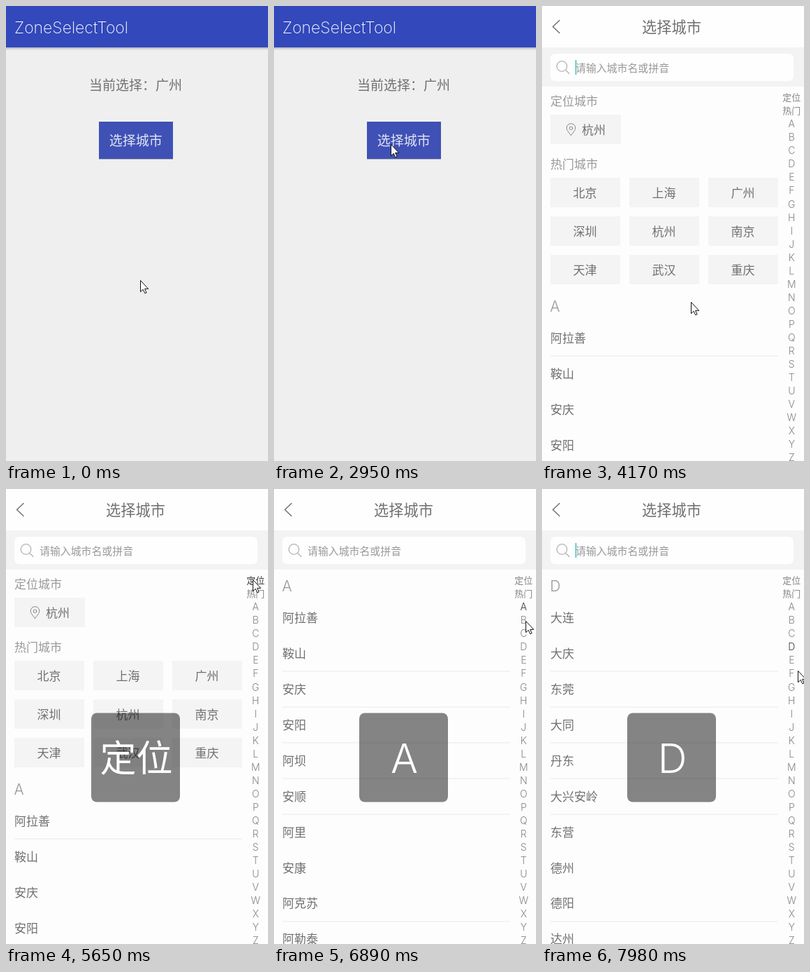
An HTML page that plays this animation: 375x649 px, repeating every 8000 ms.

```html
<!DOCTYPE html>
<html lang="zh-CN">
<head>
<meta charset="utf-8">
<title>选择城市</title>
<style>
  html, body { margin: 0; width: 100%; height: 100%; overflow: hidden; background: #efefef; }
  svg { display: block; width: 375px; height: 649px; }
  text { font-family: Inter, "Noto Sans CJK SC", "Noto Sans CJK", sans-serif; font-weight: 300; fill: #707070; }
  .soft { fill: #999; }
  .white { fill: #fff; }
  .thin { font-weight: 200; }
  .pale { fill: #e2e5f4; }
  .chip { fill: #f4f4f4; }
  .line { fill: #e9e9e9; }
  .stroke { fill: none; stroke-linecap: round; stroke-linejoin: round; }
  #index text { fill: #868686; }
  #index text.on { fill: #3c3c3c; }
  #button { fill: #3f51b5; filter: drop-shadow(0 1px .7px rgba(0,0,0,.25)); }
  #button.down { fill: #4656b7; filter: drop-shadow(0 2px 1.5px rgba(0,0,0,.35)); }
</style>
</head>
<body>
<svg id="stage" viewBox="0 0 375 649"></svg>
<script>
const LOOP = 8000, TICK = 134;   // the screen refreshes once per tick
const PRESS = 19, RELEASE = 22, TOUCH = 41;
const ROW = 50.9, INDEX_TOP = 130, INDEX_STEP = 19.04;

// turning points of the pointer: [tick, x, y]
const path = [
  [0, 192, 391], [2, 227, 349], [3, 227, 349], [6, 274, 305], [12, 173, 211],
  [15, 167, 197], [24, 167, 197], [29, 197, 459], [31, 213, 422], [35, 362, 165],
  [40, 353, 129], [42, 353, 129], [45, 355, 169], [48, 355, 169],
  [51, 360, 188], [55, 364, 246], [59, 366, 259]
];

const cities = {
  A: '阿拉善 鞍山 安庆 安阳 阿坝 安顺 阿里 安康 阿克苏 阿勒泰',
  B: '北京 保定 包头 巴彦淖尔 本溪 白山 白城 蚌埠 亳州 滨州',
  C: '承德 沧州 长治 赤峰 朝阳 长春 常州 滁州 池州 长沙',
  D: '大连 大庆 东莞 大同 丹东 大兴安岭 东营 德州 德阳 达州'
};
const hot = '北京 上海 广州 深圳 杭州 南京 天津 武汉 重庆'.split(' ');
const sections = ['定位', '热门', ...'ABCDEFGHIJKLMNOPQRSTUVWXYZ'];

// y is the vertical middle of the glyphs
const text = (x, y, size, str, cls = '', anchor = 'start') =>
  `<text x="${x}" y="${y}" dy=".37em" font-size="${size}" class="${cls}" text-anchor="${anchor}">${str}</text>`;
const mid = (x, y, size, str, cls) => text(x, y, size, str, cls, 'middle');
const rect = (x, y, w, h, attrs) => `<rect x="${x}" y="${y}" width="${w}" height="${h}" ${attrs}/>`;

// hairlines fall between pixels on two rows out of seven; phase shifts that pattern
const cityRows = (letter, top, phase) =>
  text(11.5, top, 21, letter, 'soft') +
  cities[letter].split(' ').map((city, i) => {
    const y = top + 46 + i * ROW, lined = (i + phase) % 7 % 6 > 0;
    return text(12, y, 17, city) +
      (lined ? rect(12, Math.round(y + ROW / 2) - .5, 326, 1, 'class="line"') : '');
  }).join('');

const home = `
  ${rect(0, 59, 375, 4, 'fill="url(#shade)"')}
  ${rect(0, 0, 375, 59, 'fill="#3248bb"')}
  ${text(12, 30.5, 23, 'ZoneSelectTool', 'white thin')}
  ${text(119, 113, 19, '当前选择：广州')}
  ${rect(133, 165, 106, 53, 'id="button"')}
  ${mid(185.7, 192, 19, '选择城市', 'pale')}`;

const overview = `
  ${text(12, 136, 17, '定位城市', 'soft')}
  ${rect(12, 155, 101, 42, 'class="chip"')}
  <g class="stroke" stroke="#858585">
    <path d="M41.5 184.5C38 180 35.2 177 35.2 174a6.3 6.3 0 0 1 12.6 0C47.8 177 45 180 41.5 184.5Z"/>
    <circle cx="41.5" cy="174.3" r="2.3"/>
  </g>
  ${text(57, 177, 17, '杭州')}
  ${text(12, 226, 17, '热门城市', 'soft')}
  ${hot.map((city, i) => {
    const x = 12 + i % 3 * 113, y = 245 + Math.floor(i / 3) * 55;
    return rect(x, y, 100, 42, 'class="chip"') + mid(x + 49.5, y + 21.5, 17, city);
  }).join('')}
  ${cityRows('A', 428, 5)}`;

const bar = `
  ${rect(0, 0, 375, 59, 'fill="#fefefe"')}
  ${rect(0, 59, 375, 56, 'fill="#f3f3f3"')}
  ${rect(12, 68, 348, 39, 'rx="7" fill="#fefefe"')}
  <path class="stroke" stroke="#6c6c6c" stroke-width="1.4" d="M25 20.5 15.5 29.5 25 38.5"/>
  ${mid(185.5, 30.5, 21.2, '选择城市')}
  <g class="stroke" stroke="#b4b4b4" stroke-width="1.3">
    <circle cx="28.5" cy="86" r="7.3"/><path d="M33.8 91.3 39 96.5"/>
  </g>
  ${text(48, 88.5, 14.9, '请输入城市名或拼音', 'soft')}
  ${rect(47.8, 77, 1.4, 21, 'id="caret" fill="#33b9b9"')}`;

const picker = `
  ${rect(0, 0, 375, 680, 'fill="#fdfdfd"')}
  <g id="overview">${overview}</g>
  ${Object.keys(cities).map(c => `<g data-list="${c}">${cityRows(c, 138, 0)}</g>`).join('')}
  ${bar}
  <g id="index">${sections.map((s, i) =>
    mid(357.3, INDEX_TOP + i * INDEX_STEP, s.length > 1 ? 13 : 14, s)).join('')}</g>
  <g id="popup">
    ${rect(122, 319.5, 127, 127, 'rx="8" fill="#000" fill-opacity=".48"')}
    ${mid(186.5, 384, 52, '', 'white')}
  </g>`;

const $ = sel => document.querySelector(sel);
$('#stage').innerHTML = `
  <defs><linearGradient id="shade" x2="0" y2="1">
    <stop stop-color="#000" stop-opacity=".24"/><stop offset="1" stop-color="#000" stop-opacity="0"/>
  </linearGradient></defs>
  ${home}
  <g id="picker">${picker}</g>
  <path id="pointer" fill="#fff" stroke="#111" stroke-width="1"
    d="M.5.5V16.7L4.2 13.3 6.8 18.8 9.1 17.8 6.6 12.4H11.7Z"/>`;

const ui = {
  picker: $('#picker'), overview: $('#overview'), popup: $('#popup'), label: $('#popup text'),
  caret: $('#caret'), button: $('#button'), pointer: $('#pointer'),
  lists: [...document.querySelectorAll('[data-list]')],
  index: [...document.querySelectorAll('#index text')]
};
const show = (el, on) => el.setAttribute('display', on ? 'inline' : 'none');
const move = (el, x, y) => el.setAttribute('transform', `translate(${x} ${y})`);
const clamp = v => Math.min(1, Math.max(0, v));

function pointerAt(tick) {
  const i = Math.max(1, path.findIndex(p => p[0] >= tick));
  const [t0, x0, y0] = path[i - 1], [t1, x1, y1] = path[i];
  const k = (tick - t0) / (t1 - t0);
  return [x0 + (x1 - x0) * k, y0 + (y1 - y0) * k].map(Math.round);
}

// the touched section trails the pointer by one entry
function sectionAt(tick, y) {
  if (tick < TOUCH) return '';
  return sections[Math.max(0, Math.floor((y - INDEX_TOP) / INDEX_STEP - 1))];
}

function draw(t) {
  const tick = Math.min(59, Math.floor(t / TICK));
  const [x, y] = pointerAt(tick);
  const section = sectionAt(tick, y);
  const entered = clamp((tick - RELEASE) / 3);

  move(ui.pointer, x, y);
  ui.button.setAttribute('class', tick >= PRESS && tick < RELEASE ? 'down' : '');

  show(ui.picker, entered > 0);
  ui.picker.setAttribute('opacity', entered);
  move(ui.picker, 0, 24 * (1 - entered) ** 2);
  show(ui.caret, (t + 50) % 1000 < 500);

  show(ui.overview, !(section in cities));
  move(ui.overview, 0, section === '热门' ? -90 : 0);
  ui.lists.forEach(el => show(el, el.dataset.list === section));
  ui.index.forEach((el, i) => el.setAttribute('class', sections[i] === section ? 'on' : ''));

  show(ui.popup, section);
  ui.label.textContent = section;
  ui.label.setAttribute('font-size', section.length > 1 ? 52 : 58);
}

function loop() {
  draw(performance.now() % LOOP);
  requestAnimationFrame(loop);
}
loop();
</script>
</body>
</html>
```
